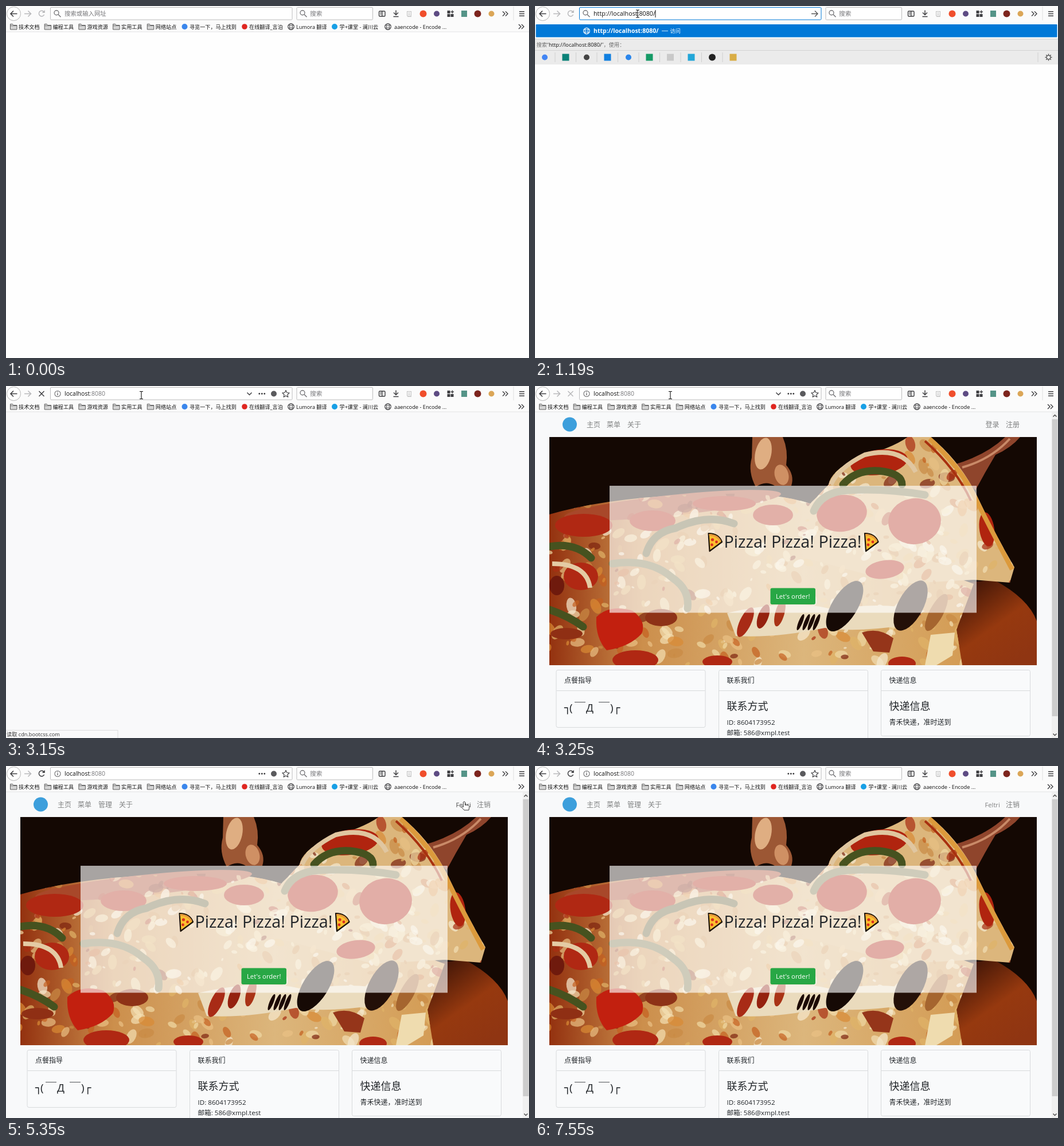
An HTML page that plays this animation: 912x614 px, repeating every 7.65 s.

```html
<!DOCTYPE html>
<html lang="zh">
<head>
<meta charset="utf-8">
<title>Pizza</title>
<style>
html, body { margin: 0; width: 100%; height: 100%; overflow: hidden; background: #fdfdfd; }
svg { display: block; width: 912px; height: 614px; }
text { font-family: "Open Sans", "Noto Sans CJK SC", "Noto Sans CJK", sans-serif; white-space: pre; }
</style>
</head>
<body>
<svg id="stage" viewBox="0 0 912 614" xmlns="http://www.w3.org/2000/svg"></svg>
<script>
const LOOP = 7650;
const INK = '#3f3f42', PALE = '#b9b9bb', BLUE = '#0078d7';

// Drawing helpers
const text = (x, y, s, size, fill = '#111', more = '') =>
  `<text x="${x}" y="${y}" font-size="${size}" fill="${fill}" ${more}>${s}</text>`;
const rect = (x, y, w, h, fill, more = '') =>
  `<rect x="${x}" y="${y}" width="${w}" height="${h}" fill="${fill}" ${more}/>`;
const dot = (x, y, r, fill, more = '') =>
  `<circle cx="${x}" cy="${y}" r="${r}" fill="${fill}" ${more}/>`;
const blob = (x, y, rx, ry, fill, turn = 0, more = '') =>
  `<ellipse rx="${rx}" ry="${ry}" fill="${fill}" transform="translate(${x} ${y}) rotate(${turn})" ${more}/>`;
const shape = (d, fill, more = '') => `<path d="${d}" fill="${fill}" ${more}/>`;
const line = (d, color = INK, w = 1.4, more = '') =>
  `<path d="${d}" fill="none" stroke="${color}" stroke-width="${w}" ${more}/>`;
const group = (id, body) => `<g id="${id}">${body}</g>`;

const folder = x =>
  shape(`M${x + .5} 31.5h4l1.5 2h6v7.5h-11.5z`, '#d4d4d4', 'stroke="#606060"') +
  line(`M${x + .5} 34.5h11.5`, '#606060', .8);
const globe = (x, y, c = INK, r = 5.3) =>
  dot(x, y, r, 'none', `stroke="${c}" stroke-width="1.1"`) +
  blob(x, y, r * .45, r, 'none', 0, `stroke="${c}" stroke-width=".9"`) +
  line(`M${x - r} ${y - 2}h${2 * r}M${x - r} ${y + 2}h${2 * r}`, c, .8);
const lens = x =>
  dot(x - 1.5, 11.7, 4, 'none', 'stroke="#77777a" stroke-width="1.4"') +
  line(`M${x + 1.5} 14.7l4.5 4.5`, '#77777a', 1.6);
const chevrons = (x, y) => line(`M${x - 5} ${y - 4}l4 4l-4 4m5-8l4 4l-4 4`);
const reloadIcon = c =>
  line('M66 10.2A4.8 4.8 0 1 0 66.6 15', c, 1.5) + shape('M67.8 7v5h-5z', c);

function toolbar() {
  const folders = ['技术文档', '编程工具', '游戏资源', '实用工具', '网络站点'];
  return rect(0, 0, 912, 45, '#fbfbfb') + rect(0, 44.5, 912, 1, '#e4e4e5') +
    dot(13.5, 13.5, 12, '#fff', 'stroke="#b4b4b4"') +
    line('M19.5 13.5H8m5-5l-5 5l5 5', INK, 1.6) +
    line('M32 13.5h11.5m-5-5l5 5l-5 5', PALE, 1.6) +
    rect(507, 2.5, 132.5, 21.5, '#fff', 'rx="1.5" stroke="#bcbcbd"') +
    lens(518.5) + text(530, 17, '搜索', 10.7, '#77777a') +
    rect(650.5, 9, 10.5, 9, 'none', `rx="1.5" stroke="${INK}" stroke-width="1.4"`) +
    line('M655.8 9v9M652.5 11.5h1.8M652.5 14h1.8') +
    line('M680 7.5v8m-4-4l4 4l4-4M675.5 18.5h9', INK, 1.5) +
    rect(699.5, 9.5, 7, 7.5, 'none', 'stroke="#c2c2c2"') + line('M701 12h4M701 14.5h4M700 18.5h7', '#c2c2c2', 1) +
    dot(727.5, 13.5, 6, '#f04e2c') + dot(751, 13.5, 5, '#5d4b83') +
    rect(769.5, 8, 5, 5, INK) + rect(769.5, 14, 5, 5, INK) + rect(775.5, 14, 5, 5, INK) +
    line('M778.3 7.5v5.5M775.5 10.2h5.5') +
    rect(794, 8, 10, 11, '#559488') + dot(822.5, 13.5, 6, '#7d241d') + dot(846.5, 13.5, 5, '#dba657') +
    chevrons(871, 13.5) + rect(884.5, 1, 1, 24, '#e0e0e0') +
    line('M895 9.8h9M895 13.5h9M895 17.2h9', INK, 1.5) +
    folders.map((s, i) => folder(7 + i * 59.7) + text(22 + i * 59.7, 39.5, s, 9.15)).join('') +
    dot(311.5, 36, 5, '#3b87ec') + text(320, 39.5, '寻览一下，马上找到', 9.1) +
    dot(416, 36, 4.8, '#df2620') + text(424, 39.5, '在线翻译_言泊', 9.15) +
    globe(497, 36) + text(506, 39.5, 'Lumora 翻译', 9.15) +
    dot(573, 36, 5, '#18a0e6') + text(581.5, 39.5, '学+课堂 - 澜川云', 9.15) +
    globe(666, 36) + text(677, 39.5, 'aaencode - Encode ...', 9.25) +
    chevrons(899, 36);
}

function addressBar() {
  return '<rect id="field" x="77.5" y="2.5" width="421.5" height="21.5" rx="1.5" fill="#fff"/>' +
    group('lens', lens(89.5)) +
    group('hint', text(102, 17, '搜索或输入网址', 10.4, '#77777a')) +
    group('typed', text(102, 17, 'http://localhost:8080/', 10.75) +
      line('M482 13.5h11m-5-5l5 5l-5 5', '#555', 1.3)) +
    group('visited', dot(90, 13.5, 5, 'none', 'stroke="#6a6a6d" stroke-width="1.1"') +
      line('M90 12.3v4M90 9.7v1.4', '#6a6a6d') +
      text(102, 17, 'localhost<tspan fill="#77777a">:8080</tspan>', 10.55) +
      dot(441.8, 13.5, 1.4, INK) + dot(446.3, 13.5, 1.4, INK) + dot(450.8, 13.5, 1.4, INK) +
      dot(467, 13.5, 5, '#5a5a5d') +
      shape('M488 7.5l1.8 4l4.3.5l-3.2 3l.9 4.3l-3.8-2.2l-3.8 2.2l.9-4.3l-3.2-3l4.3-.5z', 'none',
        `stroke="${INK}" stroke-width="1.2" stroke-linejoin="round"`)) +
    group('chevron', line('M420.5 11.5l4 4l4-4', INK, 1.5)) +
    '<rect id="caret" y="7" width="1" height="13" fill="#111"/>' +
    group('idle', reloadIcon(PALE)) + group('reload', reloadIcon(INK)) +
    line('M57.5 9l9 9m0-9l-9 9', INK, 1.5, 'id="stop"');
}

function dropdown() {
  const engines = ['#4285f4', '#0b8278', '#444', '#1180e0', '#2a86ec', '#159a66', '#c9c9c9', '#22a6d8', '#222', '#d9ad45'];
  const square = [1, 3, 5, 6, 7, 9];
  const icons = engines.map((c, i) => {
    const x = 17 + i * 36.5;
    return (square.includes(i) ? rect(x - 6, 83.5, 12, 12, c) : dot(x, 89.5, i == 8 ? 6 : 5, c)) +
      (i < 9 ? rect(x + 17.5, 81, 1, 17, '#cfcfcf') : '');
  }).join('');
  const teeth = [0, 45, 90, 135].map(a =>
    line('M0-6v2.2M0 6v-2.2', '#555', 1.5, `transform="translate(895.5 89.5) rotate(${a})"`)).join('');
  return rect(0, 27, 912, 75, '#fbfbfb') + rect(1.5, 32, 909, 22.5, BLUE, 'rx="1"') +
    globe(90, 43.5, '#fff') +
    text(102, 47, 'http://localhost:8080/', 10.5, '#fff', 'font-weight="700"') +
    rect(221, 43, 11, 1, '#cfe5f7') + text(235.5, 47, '访问', 9.2, '#fff') +
    rect(0, 57, 912, 45, '#ebebeb') + rect(0, 57, 912, 1, '#cfcfcf') + rect(0, 77, 912, 1, '#d2d2d2') +
    text(2.5, 71, '搜索“<tspan fill="#111">http://localhost:8080/</tspan>”，使用：', 9.2, '#6d6d6d') +
    icons + rect(876.5, 81, 1, 17, '#cfcfcf') +
    dot(895.5, 89.5, 3.4, 'none', 'stroke="#555" stroke-width="1.3"') + teeth;
}

// Random flecks of cheese and sauce; the rim is redder than the middle
function flecks() {
  const cheese = ['#f6ead0', '#efd9a4', '#f3dfb4', '#e0b468', '#c98a45'];
  const sauce = ['#a82d12', '#c4601f', '#7d2410', '#d98a35', '#e9c184'];
  let seed = 7, out = '';
  const rnd = () => (seed = seed * 16807 % 2147483647) / 2147483647;
  for (let i = 0; i < 620; i++) {
    const x = 25 + rnd() * 810, y = 100 + rnd() * 387, r = 1.5 + rnd() * 7;
    const heat = x < 150 ? .6 : y < 230 ? .5 : y > 430 ? .3 : .15;
    const tones = rnd() < heat ? sauce : cheese;
    out += blob(x.toFixed(1), y.toFixed(1), (r * 1.7).toFixed(1), r.toFixed(1),
      tones[Math.floor(rnd() * 5)], Math.floor(rnd() * 180), 'opacity=".7"');
  }
  return out;
}

// Pizza backdrop in flat shapes
function photo() {
  const pie = 'M25 224Q140 190 330 188Q420 186 480 205L540 240L640 300L765 345L735 425L745 487H25z';
  const slice = 'M512 172Q515 150 560 125Q620 110 650 89H690Q740 130 770 190Q800 255 836 316L828 343L765 338L640 345L470 300Q440 240 490 195z';
  const red = [[85, 243, 50, 20], [205, 235, 40, 18], [330, 205, 55, 13], [415, 225, 35, 18], [80, 332, 30, 24],
    [175, 478, 40, 17], [318, 481, 26, 11], [640, 484, 24, 12]];
  const topRed = [[600, 133, 50, 22], [535, 222, 44, 32], [662, 236, 46, 40], [788, 250, 13, 30], [610, 320, 34, 16]];
  const pepper = (d, c = '#46521f') => line(d, c, 13, 'stroke-linecap="round"');
  return `<defs>
    <clipPath id="frame"><rect x="25" y="89" width="850" height="398"/></clipPath>
    <clipPath id="food"><path d="${pie}"/><path d="${slice}"/></clipPath>
    <linearGradient id="crust"><stop stop-color="#93310f"/><stop offset=".22" stop-color="#cc8f4c"/><stop offset=".6" stop-color="#dcb67c"/><stop offset="1" stop-color="#d39a52"/></linearGradient>
    <linearGradient id="board" x2=".7" y2="1"><stop stop-color="#2c0d05"/><stop offset=".6" stop-color="#96390f"/><stop offset="1" stop-color="#8f3512"/></linearGradient>
    </defs><g clip-path="url(#frame)">` +
    rect(25, 89, 850, 398, '#140803') +
    shape('M730 487L735 345L800 338Q860 370 875 410V487z', 'url(#board)') +
    shape('M728 138Q785 122 820 89H846Q830 108 803 120Q785 150 768 182z', '#8f452c') +
    line('M745 142Q795 128 828 92', '#c98a68', 4) +
    shape('M379 89H432Q442 112 438 138Q453 155 447 174H418Q402 164 385 176Q371 150 378 125z', '#9c5734') +
    blob(398, 118, 14, 28, '#dfae82', 12) + blob(430, 155, 12, 18, '#cf9064', -15) +
    shape(pie, 'url(#crust)') + blob(240, 208, 190, 18, '#a8482a', -6) +
    shape(slice, '#dcb67c') + `<g clip-path="url(#food)">${flecks()}</g>` +
    red.map(p => blob(...p, '#b02813')).join('') + topRed.map(p => blob(...p, '#b0240f', -8)).join('') +
    line('M688 92Q745 145 770 200Q800 260 832 320', '#dc9a3c', 8) +
    line('M680 96Q735 145 760 200', '#a8300f', 4) +
    line('M516 172Q530 142 575 120Q640 104 664 150', '#e0c6a0', 8) +
    pepper('M537 172Q560 145 600 148Q640 152 640 172') + pepper('M486 218Q500 185 545 182Q610 178 680 190', '#7d7448') +
    pepper('M25 280Q70 272 98 300') + pepper('M194 292Q205 255 245 248Q300 222 347 240', '#6b6337') +
    pepper('M135 310Q200 300 240 335Q270 355 266 388', '#7d7448') + pepper('M25 390Q60 402 84 420') +
    line('M30 310Q90 310 96 352', '#e4cba4', 8) +
    shape('M107 403Q130 380 170 392Q195 410 186 432Q165 455 125 461Q105 440 107 403z', '#c2200f') +
    blob(220, 404, 28, 15, '#8e3217') + blob(55, 432, 28, 10, '#8f2f14') + blob(38, 348, 13, 17, '#6f1a0d') +
    shape('M570 430Q600 420 625 440L618 465L590 463z', '#95351a') +
    shape('M335 396Q450 370 520 390Q600 375 680 392L640 418Q560 430 505 422Q420 440 350 436z', '#eadbbd') +
    blob(367, 412, 10, 28, '#a82b16', 25) + blob(398, 402, 9, 22, '#94210f', 20) + blob(427, 396, 8, 24, '#a93316', 15) +
    [463, 473, 482, 491].map(x => blob(x, 412, 3.5, 15, '#1c0a05', 22)).join('') +
    blob(540, 384, 22, 50, '#160a05', 32) + blob(655, 383, 22, 48, '#241008', 28) +
    blob(700, 395, 12, 36, '#a5652f', 28) +
    shape('M690 434L732 430L728 470L700 487H680z', '#efdcaf') + '</g>';
}

const pizzaSlice = x =>
  `<g transform="translate(${x} 255)" stroke="#1d1309" stroke-linejoin="round">` +
  shape('M2 2Q20 2 25.5 17L4 33z', '#fcc02f', 'stroke-width="2.2"') +
  line('M3 4.5Q18 5 23 16', '#e59a3c', 3) +
  dot(9, 13, 2.6, '#d9301f', 'stroke="none"') + dot(16, 17, 2.4, '#d9301f', 'stroke="none"') +
  dot(8, 22, 2.4, '#d9301f', 'stroke="none"') + '</g>';

function page() {
  const grey = '#7f8081', dark = '#212529';
  const nav = (x, s) => text(x, 72, s, 12, grey);
  const card = (x, h, head) =>
    rect(x + .5, 495.5, 260, h, '#f9fafb', 'rx="3" stroke="#d8dadc"') +
    rect(x + 1, 531, 259, 1, '#d8dadc') + text(x + 14.5, 518, head, 12, dark);
  const corner = (x, s) => `<tspan x="${x}" font-family="DejaVu Sans Mono, monospace">${s}</tspan>`;
  return rect(0, 45, 912, 569, '#f8f9fa') + dot(60.5, 67, 12.5, '#3d9fdc') +
    nav(90, '主页') + nav(125, '菜单') +
    group('guest', nav(161, '关于') + nav(785.5, '登录') + nav(821, '注册')) +
    group('member', nav(161, '管理') + nav(197, '关于') + text(784.5, 72, 'Feltri', 11.2, grey, 'id="user"') + nav(821, '注销')) +
    photo() + rect(130, 174, 640, 221.5, '#fff', 'opacity=".63"') +
    pizzaSlice(300.5) + pizzaSlice(573) +
    text(449.5, 282, 'Pizza! Pizza! Pizza!', 28.7, dark, 'text-anchor="middle"') +
    rect(410.5, 352.5, 78.5, 28.5, '#28a745', 'rx="3"') +
    text(449.7, 371, 'Let\'s order!', 11.4, '#fff', 'text-anchor="middle"') +
    card(36.5, 100, '点餐指导') + card(320, 140, '联系我们') + card(603, 115, '快递信息') +
    text(51, 568, corner(51, '┐') + '<tspan x="60">(</tspan><tspan x="69">￣</tspan><tspan x="89">Д</tspan>' +
      '<tspan x="111">￣</tspan><tspan x="131">)</tspan>' + corner(137, '┌'), 19, dark) +
    text(334.5, 565, '联系方式', 18, dark) + text(334.5, 591, 'ID: 8604173952', 11.6, dark) +
    text(334.5, 609, '邮箱: 586@xmpl.test', 11.6, dark) +
    text(617.5, 565, '快递信息', 18, dark) + text(617.5, 591, '青禾快递，准时送到', 12, dark) +
    rect(901, 46, 11, 568, '#f0f0f0') + rect(901.5, 58, 10, 518, '#cdcdcd') +
    line('M903.5 53.5l3-3l3 3M903.5 606.5l3 3l3-3', '#505050', 1.5);
}

const cursors =
  group('beam', line('M-3-6.5h2.2l.8.8l.8-.8H3M0-6V6M-3 6.5h2.2l.8-.8l.8.8H3', '#111', 1.1)) +
  group('arrow', shape('M0 0V12L2.8 9.4L4.8 13.6L6.6 12.8L4.7 8.8H8.5z', '#fff', 'stroke="#222" stroke-width=".8"')) +
  group('hand', shape('M-1.6 1Q0-1.2 1.6 1V6.2Q8 5.5 9 8.5L8 15H0L-5 9.5Q-4.5 7.5-1.6 9.5z', '#fff', 'stroke="#222" stroke-width=".9"'));

const stage = document.getElementById('stage');
stage.innerHTML = rect(0, 0, 912, 614, '#fefefe') +
  group('blank', rect(0, 45, 912, 569, '#f9f9fa')) + group('page', page()) +
  toolbar() + addressBar() + group('drop', dropdown()) +
  group('status', rect(-1, 600.5, 196, 15, '#f9f9fa', 'stroke="#dcdcdc"') + text(1, 611, '读取 cdn.bootcss.com', 9.2, '#333')) +
  group('pointer', cursors);

const el = {};
stage.querySelectorAll('[id]').forEach(n => el[n.id] = n);
const show = (id, on) => el[id].setAttribute('display', on ? 'inline' : 'none');

// Pointer moves: first step, last step, steps, then a quadratic curve
const moves = [
  [100, 740, 7, 230, 341, 215, 60, 179, 13.5],
  [1510, 1840, 4, 190, 17, 215, 26, 236, 16],
  [3830, 4580, 8, 237, 19, 246, 50, 263, 103],
  [4700, 5350, 7, 285, 130, 600, 300, 799, 62],
  [6210, 6330, 2, 799, 60, 799, 60, 798, 61],
  [6650, 7330, 7, 810, 128, 840, 320, 880, 492],
  [7430, 7550, 2, 892, 607, 894, 620, 896, 640]
];

function pointerAt(t) {
  const [t0, t1, n, x0, y0, cx, cy, x1, y1] = moves.filter(m => m[0] <= t).pop() || moves[0];
  const step = Math.max(0, Math.min(n - 1, Math.floor((t - t0) / (t1 - t0) * (n - 1) + 1e-6)));
  const u = step / (n - 1), k = u * u * (3 - 2 * u);
  const curve = (a, b, c) => (1 - k) * (1 - k) * a + 2 * k * (1 - k) * b + k * k * c;
  return [curve(x0, cx, x1), curve(y0, cy, y1)];
}

function update(t) {
  const within = (a, b) => t >= a && t < b;
  const [x, y] = pointerAt(t);
  const overField = y < 26 && x > 77 && x < 499;
  const overUser = x > 784 && x < 812 && y > 55 && y < 78;
  const focused = within(640, 2280), loaded = t >= 3250;

  show('lens', t < 2280);
  show('hint', t < 1190);
  show('typed', within(1190, 2280));
  show('drop', within(1190, 2280));
  show('visited', t >= 2280);
  show('blank', within(2390, 3250));
  show('status', within(2500, 3250));
  show('page', loaded);
  el.field.setAttribute('stroke', focused ? BLUE : '#bcbcbd');
  show('caret', focused);
  el.caret.setAttribute('x', t < 1190 ? 101.5 : 209.5);

  show('idle', t < 2280);
  show('stop', within(2280, 3830));
  el.stop.setAttribute('stroke', loaded ? PALE : INK);
  show('reload', t >= 3830);
  show('chevron', t >= 2280 && overField);

  show('guest', t < 3470);
  show('member', t >= 3470);
  el.user.setAttribute('fill', overUser ? '#4a4b4b' : '#7f8081');

  show('pointer', t >= 100);
  el.pointer.setAttribute('transform', `translate(${x.toFixed(1)} ${y.toFixed(1)})`);
  show('beam', overField);
  show('hand', overUser);
  show('arrow', !overField && !overUser);
}

const start = performance.now();
function tick() {
  update((performance.now() - start) % LOOP);
  requestAnimationFrame(tick);
}
tick();
</script>
</body>
</html>
```
